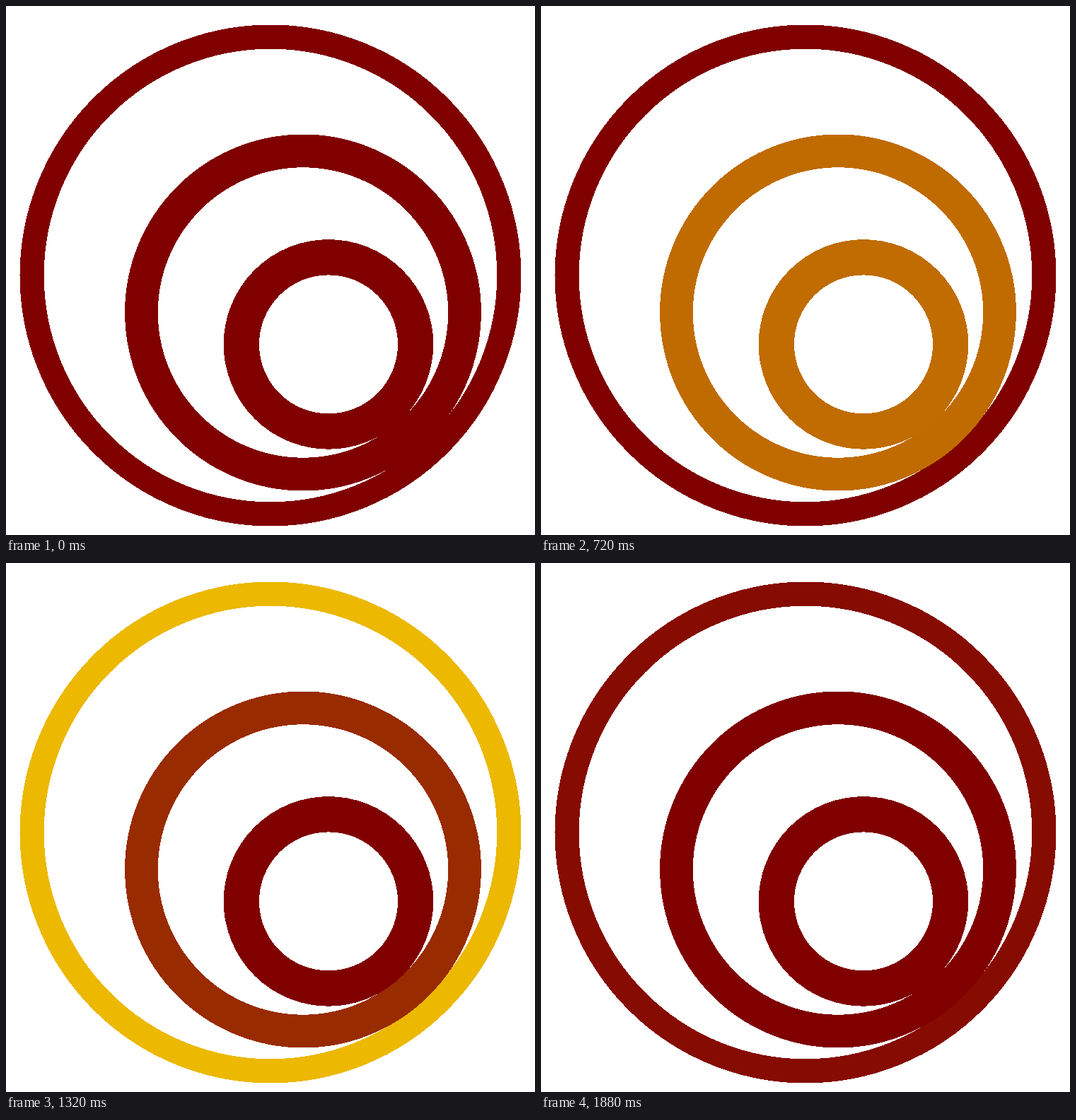
An HTML page that plays this animation: 748x748 px, repeating every 1.96 s.

```html
<!DOCTYPE html>
<html lang="en">
<head>
<meta charset="utf-8">
<title>Pulsing rings</title>
<style>
  html, body { margin: 0; width: 100%; height: 100%; overflow: hidden; background: #fff; }
  svg { display: block; width: 100vw; height: 100vh; }
  circle { fill: none; shape-rendering: crispEdges; }
</style>
</head>
<body>
<svg id="stage" viewBox="0 0 748 748"></svg>
<script>
const LOOP = 1960, STEP = 40, STAGE = 480;
const MAROON = [128, 0, 0], GOLD = [255, 215, 0];

// Listed from the innermost ring, which lights up first.
const rings = [
  { cx: 456, cy: 478.4, outer: 148.3, inner: 98 },
  { cx: 420, cy: 433.5, outer: 252, inner: 205.2 },
  { cx: 374, cy: 381, outer: 354.5, inner: 320.3 }
];

const stage = document.getElementById("stage");
const circles = rings.map(({ cx, cy, outer, inner }) => {
  const circle = document.createElementNS("http://www.w3.org/2000/svg", "circle");
  const attributes = { cx, cy, r: (outer + inner) / 2, "stroke-width": outer - inner };
  for (const name in attributes) circle.setAttribute(name, attributes[name]);
  stage.prepend(circle);
  return circle;
});

const wave = u => (1 - Math.cos(Math.PI * u)) / 2;

// Rises smoothly for one stage, then falls a little more evenly.
function glow(u) {
  if (u <= 0 || u >= 2) return 0;
  return u <= 1 ? wave(u) : (wave(u) + 2 - u) / 2;
}

const mix = k => `rgb(${MAROON.map((c, i) => Math.round(c + (GOLD[i] - c) * k))})`;

// Time runs in steps and pauses briefly around each stage boundary.
function steppedTime(ms) {
  const t = Math.floor((ms % LOOP) / STEP) * STEP;
  const boundary = Math.round(t / STAGE) * STAGE;
  if (Math.abs(t - boundary) > STEP) return t;
  return Math.max(0, boundary - STEP);
}

function draw(ms) {
  const t = steppedTime(ms);
  circles.forEach((circle, i) => circle.setAttribute("stroke", mix(glow(t / STAGE - i))));
}

const start = performance.now();
function tick() {
  draw(performance.now() - start);
  requestAnimationFrame(tick);
}
tick();
</script>
</body>
</html>
```
